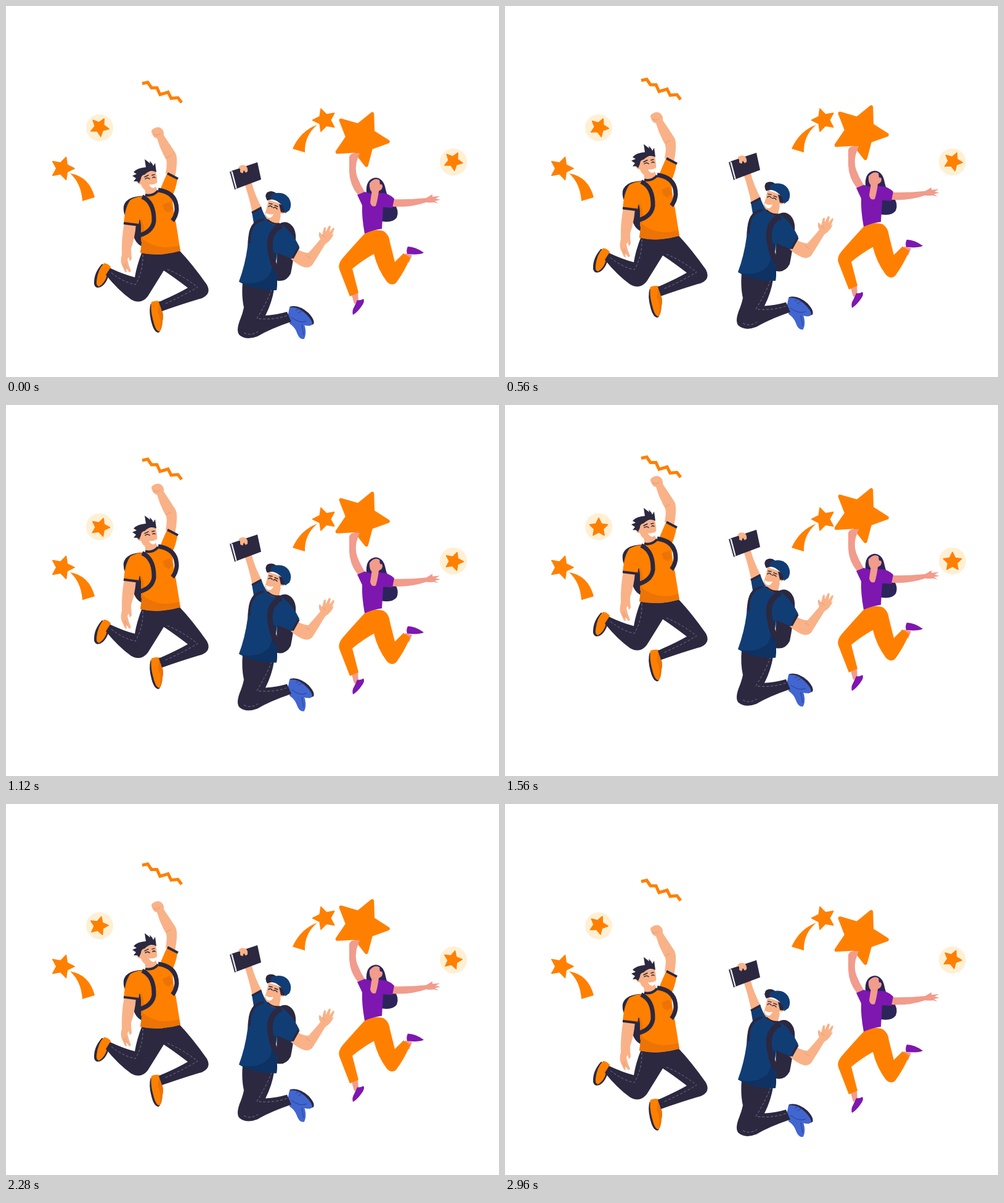
These frames come from a looping animation (800 by 603 pixels, 3 s). An HTML page:

```html
<!DOCTYPE html>
<html lang="en">
<head>
<meta charset="utf-8">
<title>Jumping students</title>
<style>
html, body { margin: 0; width: 100%; height: 100%; overflow: hidden; background: #fff; }
svg { display: block; width: 100vw; height: 100vh; }
.orange { fill: #ff8000; }
.shade { fill: #ec7406; }
.dark { fill: #2b2840; }
.skin { fill: #f9b288; }
.rose { fill: #f19c8c; }
.purple { fill: #7d17b0; }
.blue { fill: #113d75; }
.shoe { fill: #4266d0; }
.strap { fill: none; stroke: #2b2840; }
.seam { fill: none; stroke: #77758a; stroke-width: 1; stroke-dasharray: 4 3; }
.fold { fill: none; stroke: #e39a72; stroke-width: 1; }
.line { fill: none; stroke: #2b2840; stroke-width: 1.5; stroke-linecap: round; }
.star { fill: #ff8000; stroke: #ff8000; stroke-linejoin: round; }
.halo { fill: #fff0d4; }
</style>
</head>
<body>
<svg viewBox="0 0 800 603" preserveAspectRatio="none">
  <polyline id="zigzag" points="221,126 230,124 236,133 245,133 250,144 263,140 268,150 279,149 285,157"
    fill="none" stroke="#ff8000" stroke-width="5"/>
  <path class="orange" d="M104 272Q135 277 144 311L124 317Q122 288 104 272Z"/>
  <path class="orange" d="M505 193Q478 203 465 232L485 238Q484 211 505 193Z"/>
  <g id="stars"></g>

  <g id="waver">
    <!-- bag and hanging arm -->
    <path class="dark" d="M238 309Q196 306 191 325Q189 342 202 350L238 340Z"/>
    <path class="dark" d="M208 345L232 350L226 392Q212 390 207 374Z"/>
    <path class="skin" d="M192 352L211 355Q209 378 203 394Q203 402 204 411L201 415L199 408L197 412Q199 422 203 431L200 433L195 426L196 433L193 432L188 421Q185 414 188 404Q187 378 192 352Z"/>
    <path class="fold" d="M193 418L197 428M191 420L194 428"/>
    <!-- shoes and trousers -->
    <path class="dark" d="M156 419Q142 434 143 452Q145 460 153 457Q164 452 169 430Z"/>
    <path class="orange" d="M159 418Q165 418 170 424Q168 432 164 437Q161 450 151 456Q146 455 147 447Q149 428 159 418Z"/>
    <path class="dark" d="M235 483Q231 496 236 514Q240 530 247 531Q251 530 250 525Z"/>
    <path class="orange" d="M236 481Q243 478 250 480L251 491Q257 500 254 512Q253 526 249 529Q243 529 239 512Q234 494 236 481Z"/>
    <path class="shade" d="M249 480L251 491Q257 500 254 512Q253 526 249 529Q253 508 246 498Z"/>
    <path class="dark" d="M221 399L282 398Q302 419 326 453Q334 468 318 475Q293 482 253 496L248 481Q278 468 295 458Q270 439 256 430Q245 448 230 472Q219 486 203 477Q182 462 162 437L169 426Q190 436 209 441Q212 422 221 399Z"/>
    <path class="seam" d="M222 404Q223 430 210 453Q190 449 169 432M262 428Q285 437 311 457Q286 472 256 485"/>
    <!-- raised arm -->
    <path class="skin" d="M237 207Q234 202 240 199Q247 195 252 199Q257 203 256 210Q266 225 275 239Q280 248 274 279L259 272Q262 258 260 250Q250 233 245 215Q239 214 237 207Z"/>
    <path class="fold" d="M239 208Q246 212 250 207M260 247L268 243"/>
    <!-- shirt -->
    <path class="orange" d="M261 273L278 283Q275 299 270 308Q271 333 276 354L283 398Q248 408 218 401Q223 377 217 344L215 356L191 354Q193 326 202 315Q212 309 226 309L250 299Q255 286 261 273Z"/>
    <path class="shade" d="M219 344Q229 368 219 384ZM221 378Q247 399 281 389L283 398Q248 408 218 401Z"/>
    <path class="shade" d="M254 323L266 318L271 330L264 336L257 332Z"/>
    <path class="strap" stroke-width="4" d="M262 272L279 281M191 353L215 356"/>
    <path class="strap" stroke-width="7" d="M247 299Q277 303 277 331Q276 342 270 349"/>
    <path class="strap" stroke-width="7" d="M221 310Q241 319 240 350Q237 369 211 374"/>
    <!-- head -->
    <path class="skin" d="M224 293L241 288L246 301Q238 308 227 308Z"/>
    <path class="strap" stroke-width="4" d="M226 307Q238 310 247 300"/>
    <path class="skin" d="M215 279Q227 267 243 269Q246 281 245 289Q241 297 231 300Q222 300 219 290Q213 290 212 284Q212 280 215 279Z"/>
    <path class="dark" d="M216 288L213 285L207 285L211 280L205 276L212 273L207 270Q213 263 227 262L225 249L234 256L233 252Q238 256 239 260L242 255L244 270Q234 265 225 274Q219 275 219 281Z"/>
    <path fill="#fff" d="M232 290Q240 291 245 287Q244 295 239 296Q234 295 232 290Z"/>
    <path class="line" d="M226 281Q230 278 233 281M238 279Q240 277 242 279M225 278L231 275M237 275L241 274"/>
  </g>

  <g id="reader">
    <path class="dark" d="M440 356Q454 346 464 357Q473 367 469 389Q466 416 462 435Q454 450 439 446Z"/>
    <!-- shoes and trousers -->
    <path class="shoe" d="M461 507Q472 506 483 515Q489 530 484 541Q476 543 472 531Q469 522 460 516Z"/>
    <path class="dark" d="M460 489Q474 484 491 499Q502 511 499 517L492 520Z"/>
    <path class="shoe" d="M460 490Q473 488 485 499Q497 510 497 517Q490 523 478 516Q467 515 457 505Z"/>
    <path class="fold" style="stroke:#263f91" d="M463 506Q477 517 488 512M470 495L477 491M474 499L481 495M480 518L483 535"/>
    <path class="dark" d="M384 449L435 460Q432 481 421 503Q439 502 456 497L463 513Q428 525 408 537Q390 544 379 535Q373 529 379 512Q384 500 386 490Q382 472 384 449Z"/>
    <path class="seam" d="M431 461Q423 482 407 508Q434 511 456 503M386 531Q397 537 409 529"/>
    <!-- raised arm with the book -->
    <path class="skin" d="M386 286L399 288Q403 305 415 328L400 337Q394 308 386 286Z"/>
    <path d="M364 269L372 298" stroke="#2b2840" stroke-width="2"/>
    <path class="dark" d="M366 268L408 254L414 282L374 297Z"/>
    <path d="M367 269L374 296" stroke="#fff" stroke-width="1.2"/>
    <path class="skin" d="M377 263Q380 257 388 259Q393 262 392 269L389 271L386 267L384 272L380 270L380 265Z"/>
    <!-- waving arm -->
    <path class="skin" d="M474 396Q485 402 491 401Q502 389 510 379Q506 371 509 367L513 372L516 360L519 360L519 367L524 357L527 358L525 368L531 360L533 362L529 372L532 370Q528 381 518 387Q506 407 497 421Q490 428 480 423Q471 419 462 411Z"/>
    <path class="fold" d="M513 372L519 377M487 405L494 410"/>
    <!-- shirt -->
    <path class="blue" d="M399 335L414 326Q418 340 426 349L450 357Q466 370 476 391L464 411L440 401L437 423Q442 443 439 462Q403 462 378 448Q388 421 392 391Q392 371 402 353Z"/>
    <path fill="#0d3263" d="M439 402L437 423Q442 443 439 462Q403 462 378 448Q407 456 425 440Q436 425 430 401Z"/>
    <path class="strap" stroke-width="3.5" d="M399 336L414 328M475 392L465 410"/>
    <path class="strap" stroke-width="4" d="M418 347Q394 350 395 386"/>
    <path class="strap" stroke-width="9" d="M447 357Q421 369 431 406Q434 426 446 435"/>
    <!-- head -->
    <path class="skin" d="M427 337L446 340L443 354Q432 358 424 348Z"/>
    <path class="strap" stroke-width="3" d="M424 347Q433 356 444 354"/>
    <path class="skin" d="M426 315L450 323Q455 327 453 335Q450 339 446 337Q441 350 431 349Q419 345 420 338Q423 331 426 315Z"/>
    <path class="dark" d="M443 322L454 325L452 336L446 335Z"/>
    <path class="blue" d="M424 316Q419 308 424 303Q431 299 438 304Q452 302 459 312Q465 322 460 332L453 337Q451 324 441 318Q433 312 424 316Z"/>
    <path class="dark" d="M424 316Q419 308 424 303Q431 299 438 304Q428 305 430 314Z"/>
    <path fill="#fff" d="M421 336Q428 340 434 338Q432 345 426 344Q421 342 421 336Z"/>
    <path class="line" d="M426 326Q429 323 432 327M434 328Q437 326 440 330M427 321L432 322M436 324L441 326"/>
  </g>

  <g id="lifter">
    <path id="bigStar" class="star" stroke-width="6"/>
    <path fill="#2c2559" d="M585 304Q583 281 600 279Q613 280 616 298Q618 310 629 320Q639 332 634 344Q627 353 610 350L606 310Z"/>
    <!-- arms -->
    <path class="rose" d="M557 245Q559 239 566 239L574 239Q571 247 569 253Q566 267 570 278Q575 291 582 302L571 307Q558 291 557 270Z"/>
    <path class="rose" d="M626 314Q653 315 682 312L692 306L692 310L704 309L697 313L705 315L696 317L702 321L694 319Q688 320 682 319Q656 328 626 326Z"/>
    <!-- feet and trousers -->
    <path class="rose" d="M560 466L571 464L572 482L565 484ZM648 402L659 405L654 417L646 412Z"/>
    <path class="purple" d="M570 478Q575 479 580 476Q583 480 577 488Q570 498 563 502Q561 495 565 489ZM652 391Q664 391 678 401Q671 405 651 403Q649 397 652 391Z"/>
    <path class="orange" d="M582 370Q600 361 613 366Q622 372 623 384L631 416Q639 408 645 402L656 409Q647 431 633 450Q626 456 618 448Q603 428 597 403Q579 413 562 427L572 466L558 472L541 428Q538 420 546 410Q567 386 582 370Z"/>
    <!-- top and head -->
    <path class="purple" d="M570 307L582 302L593 305L606 304Q620 303 630 313L627 328L612 327L610 362Q596 364 582 370Q577 342 578 324Z"/>
    <path class="rose" d="M594 299L605 301Q603 316 600 325Q593 328 591 319Z"/>
    <path class="rose" d="M590 288Q598 278 606 283L607 290Q611 289 611 294Q610 299 606 300Q601 306 594 303Q589 298 590 288Z"/>
  </g>
</svg>
<script>
const LOOP = 3000, FRAME = 40;
const byId = id => document.getElementById(id);

// Five-pointed star around (x, y); tilt is clockwise from upright, in degrees.
function starPath(x, y, radius, tilt, inner = 0.5) {
  const points = Array.from({ length: 10 }, (_, i) => {
    const a = (tilt - 90 + i * 36) * Math.PI / 180;
    const r = i % 2 ? radius * inner : radius;
    return (x + r * Math.cos(a)).toFixed(2) + ' ' + (y + r * Math.sin(a)).toFixed(2);
  });
  return 'M' + points.join('L') + 'Z';
}

function add(tag, attrs) {
  const el = document.createElementNS('http://www.w3.org/2000/svg', tag);
  for (const key in attrs) el.setAttribute(key, attrs[key]);
  return byId('stars').appendChild(el);
}

add('path', { class: 'star', 'stroke-width': 1.5, d: starPath(91.5, 264, 19.5, 18) });
add('path', { class: 'star', 'stroke-width': 1.5, d: starPath(517, 185.5, 19.5, -18) });
byId('bigStar').setAttribute('d', starPath(576, 215.5, 44, 24.5, 0.5));

const spinners = [[152, 198], [726, 253.5]].map(([x, y]) => {
  add('circle', { class: 'halo', cx: x, cy: y, r: 22 });
  return { x, y, el: add('path', { class: 'star', 'stroke-width': 1.5 }) };
});

const jumpers = [['waver', 82], ['reader', 51.5], ['lifter', 37.3]]
  .map(([id, height]) => ({ el: byId(id), height }));

const zigzagKeys = [[0, 0], [300, -0.7], [560, -5], [1120, -36], [1540, -39.5],
  [1880, -37], [2280, -26.5], [2800, 0], [3000, 0]];

// Smooth curve through the keys, without overshoot.
function follow(keys, t) {
  const slope = i => (keys[i + 1][1] - keys[i][1]) / (keys[i + 1][0] - keys[i][0]);
  const tangent = i => {
    if (i === 0 || i === keys.length - 1) return 0;
    const a = slope(i - 1), b = slope(i);
    return a * b > 0 ? 2 * a * b / (a + b) : 0;
  };
  const i = Math.max(0, keys.findIndex(k => k[0] > t) - 1);
  const [t0, v0] = keys[i], [t1, v1] = keys[i + 1];
  const span = t1 - t0, u = (t - t0) / span, w = 1 - u;
  return w * w * ((1 + 2 * u) * v0 + u * span * tangent(i))
    + u * u * ((1 + 2 * w) * v1 - w * span * tangent(i + 1));
}

const shift = (el, y) => el.setAttribute('transform', `translate(0 ${y.toFixed(2)})`);

function draw(t) {
  const lift = (1 - Math.cos((t - 8) / LOOP * 2 * Math.PI)) / 2;
  for (const { el, height } of jumpers) shift(el, -height * lift);
  shift(byId('zigzag'), follow(zigzagKeys, t));

  // The stars turn about a point slightly off their middle.
  const turn = t / LOOP * 360;
  const a = (turn - 100) * Math.PI / 180;
  for (const { x, y, el } of spinners) {
    el.setAttribute('d', starPath(x + 1.2 * Math.cos(a), y + 1.2 * Math.sin(a), 15.5, turn + 28.8));
  }
}

const start = performance.now();
function tick() {
  const t = (performance.now() - start) % LOOP;
  draw(Math.floor(t / FRAME) * FRAME);
  requestAnimationFrame(tick);
}
tick();
</script>
</body>
</html>
```
